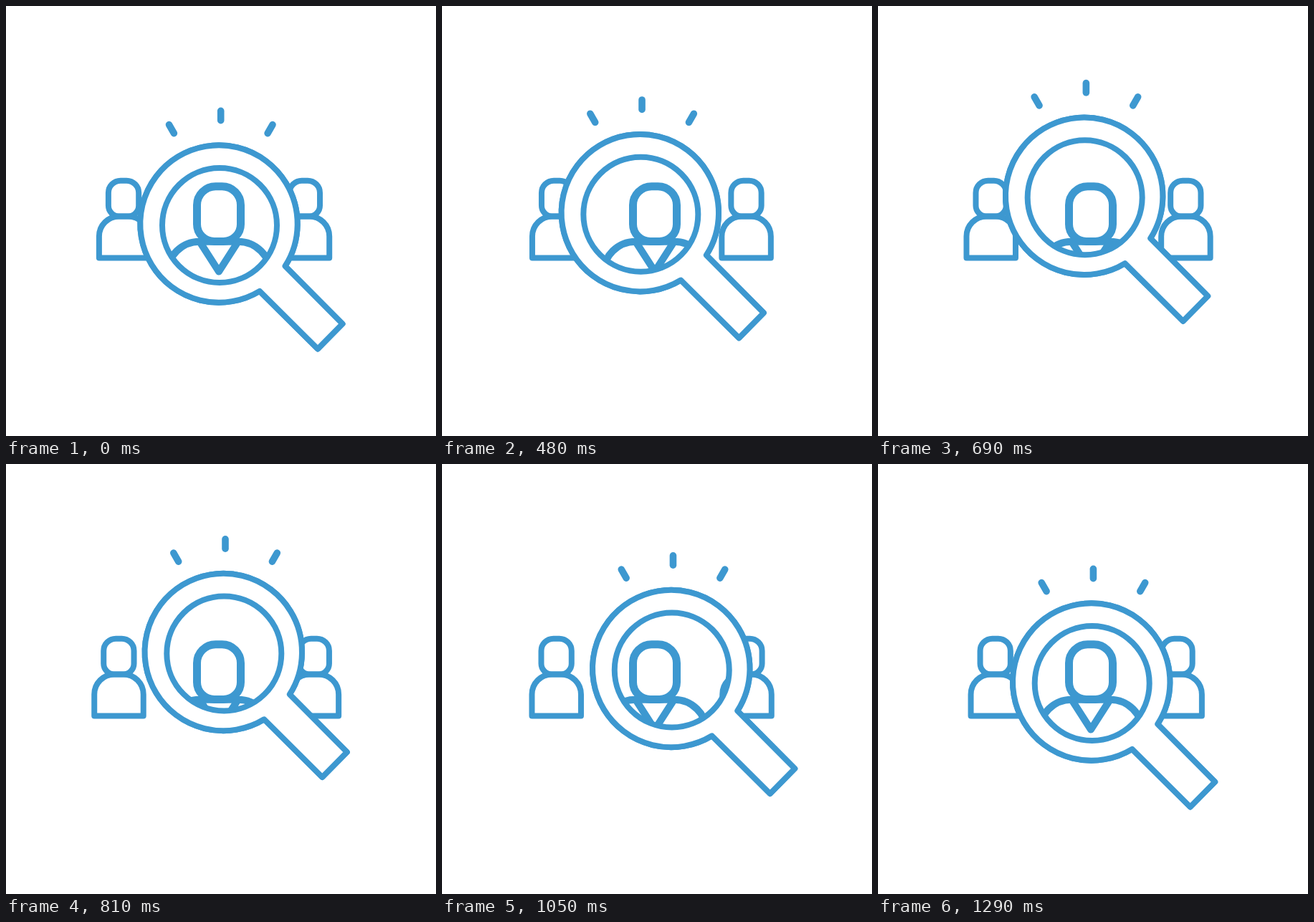
An HTML page with a canvas for the animation above (1.32 s loop, 600 by 600 pixels).

```html
<!DOCTYPE html>
<html lang="en">
<head>
<meta charset="utf-8">
<title>People search</title>
<style>
html, body { margin: 0; width: 100%; height: 100%; overflow: hidden; background: #fff; }
canvas { display: block; }
</style>
</head>
<body>
<canvas id="stage" width="600" height="600"></canvas>
<script>
const ctx = document.getElementById('stage').getContext('2d');
const BLUE = '#3d98d0';
const LOOP = 1320, HOLD = 270, STEP = 30, STEPS = 36;
const TAU = Math.PI * 2;

// Lens orbit: step, angle in degrees (from the bottom, clockwise), radius
const ORBIT = [
  [0, 2.7, 21], [1, 12, 21.1], [8, 75.3, 22.4], [12, 116.2, 20.4],
  [19, 194.5, 21.2], [27, 276.5, 21.9], [35, 360.8, 21], [36, 362.7, 21]
];

function slope(i, k) {
  const a = ORBIT[Math.max(i - 1, 0)];
  const b = ORBIT[Math.min(i + 1, ORBIT.length - 1)];
  return (b[k] - a[k]) / (b[0] - a[0]);
}

// Cubic Hermite through the orbit keys
function orbit(step, k) {
  let i = 0;
  while (i < ORBIT.length - 2 && step >= ORBIT[i + 1][0]) i++;
  const a = ORBIT[i], b = ORBIT[i + 1];
  const d = b[0] - a[0], u = (step - a[0]) / d;
  const u2 = u * u, u3 = u2 * u;
  return a[k] * (2 * u3 - 3 * u2 + 1) + b[k] * (3 * u2 - 2 * u3)
    + d * (slope(i, k) * (u3 - 2 * u2 + u) + slope(i + 1, k) * (u3 - u2));
}

function lensOffset(step) {
  const a = orbit(step, 1) * Math.PI / 180, r = orbit(step, 2);
  return [1 - r * Math.sin(a), -21 + r * Math.cos(a)];
}

function stroke(width) {
  ctx.lineWidth = width;
  ctx.stroke();
}

function line(...pts) {
  ctx.beginPath();
  for (let i = 0; i < pts.length; i += 2) ctx.lineTo(pts[i], pts[i + 1]);
}

function box(x, y, w, h, radii) {
  ctx.beginPath();
  ctx.roundRect(x, y, w, h, radii);
}

function sidePerson(x) {
  box(x + 13, 243.7, 42.3, 49.8, [17, 17, 15, 15]);
  stroke(8);
  box(x, 293.5, 68.5, 58, [28, 28, 0, 0]);
  stroke(8);
}

function mainPerson(dx, dy) {
  ctx.save();
  ctx.beginPath();
  ctx.arc(298 + dx, 306 + dy, 80, 0, TAU);
  ctx.clip();
  box(266.5, 251.8, 61, 76.7, [26, 26, 24, 24]);
  stroke(11);
  box(225, 328.7, 144, 120, [45, 45, 0, 0]);
  stroke(10);
  line(271, 330, 297, 370.5, 323, 330);
  stroke(10);
  ctx.restore();
}

function magnifier(dx, dy) {
  ctx.save();
  ctx.translate(dx, dy);
  ctx.beginPath();
  ctx.arc(297, 304, 109.7, Math.atan2(94, 57), Math.atan2(59, 92.5) + TAU);
  ctx.lineTo(469.5, 443.5);
  ctx.lineTo(435, 478.5);
  ctx.closePath();
  stroke(8);
  // White frame with a see-through lens
  ctx.moveTo(378, 306);
  ctx.arc(298, 306, 80, 0, TAU);
  ctx.fill('evenodd');
  stroke(8);

  line(299.7, 146.3, 299.7, 159.7);
  stroke(9.6);
  line(227.5, 165.6, 234.4, 177.6);
  stroke(9.6);
  line(372, 165.6, 365.1, 177.6);
  stroke(9.6);
  ctx.restore();
}

function draw(t) {
  const step = t < HOLD ? 0 : Math.floor((t - HOLD) / STEP) + 1;
  const spread = Math.pow(Math.sin(Math.PI * step / STEPS), 1.2);
  const [dx, dy] = step ? lensOffset(step) : [0, 0];

  ctx.fillStyle = '#fff';
  ctx.fillRect(0, 0, 600, 600);
  ctx.strokeStyle = BLUE;
  ctx.lineCap = ctx.lineJoin = 'round';

  sidePerson(129.9 - 6.7 * spread);
  sidePerson(382.7 + 13 * spread);
  mainPerson(dx, dy);
  magnifier(dx, dy);
}

const start = performance.now();
function tick() {
  draw((performance.now() - start) % LOOP);
  requestAnimationFrame(tick);
}
tick();
</script>
</body>
</html>
```
